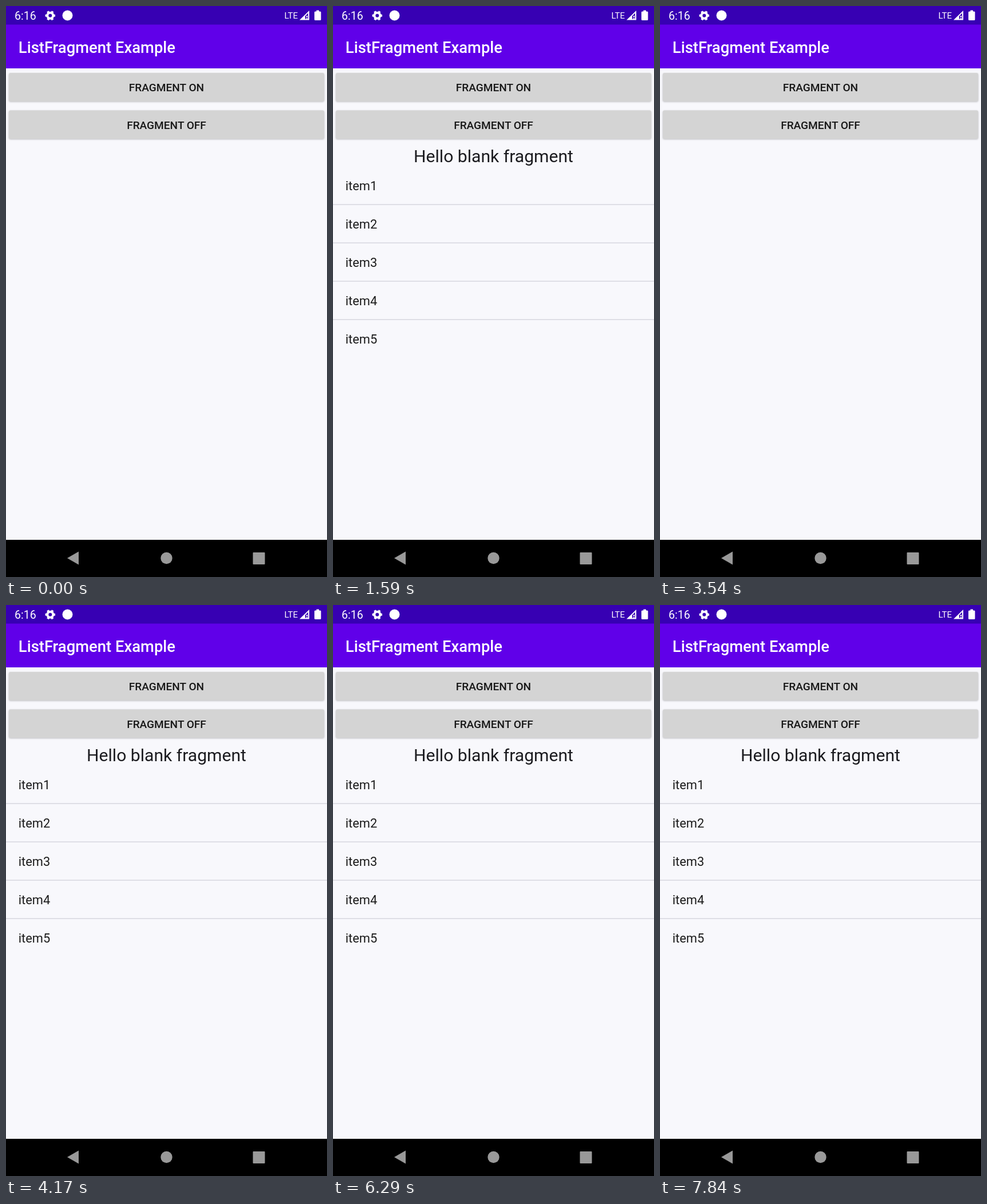
Recreate the animation shown at these times as an HTML page. Size 561x998 px, loop 8 s.

```html
<!DOCTYPE html>
<html lang="en">
<head>
<meta charset="utf-8">
<title>ListFragment Example</title>
<style>
  html, body { margin: 0; width: 100%; height: 100%; overflow: hidden; background: #f8f8fc; }
  svg { display: block; width: 100vw; height: 100vh; font-family: Roboto, sans-serif; }
  .title { font-size: 27.4px; font-weight: 500; fill: #fff; }
  .label { font-size: 19.1px; font-weight: 500; fill: #171717; text-anchor: middle; }
  .button { fill: #d4d4d4; filter: drop-shadow(0 1.5px 1.5px rgba(0, 0, 0, .25)); }
  .hello { font-size: 30.1px; fill: #1b1b1f; text-anchor: middle; }
  .item { font-size: 21.8px; fill: #1b1b1b; }
  .divider { fill: #d6d6df; }
  .status { fill: #fff; }
  .nav { fill: #999; }
</style>
</head>
<body>
<svg viewBox="0 0 561 998" preserveAspectRatio="none">
  <rect width="561" height="998" fill="#f8f8fc"/>
  <rect y="32" width="561" height="77" fill="#6000e9"/>
  <rect width="561" height="32.5" fill="#3700b3"/>

  <g class="status">
    <text x="15" y="24" font-size="19.5">6:16</text>
    <g id="gear" transform="translate(77.3 16.8)">
      <circle r="5" fill="none" stroke="#fff" stroke-width="4"/>
    </g>
    <circle cx="107.5" cy="16.5" r="9"/>
    <text x="486.5" y="22" font-size="15">LTE</text>
    <path d="M513 24.5 530 8V24.5Z"/>
    <path d="M523 17.5 528 12.5V22.5H523Z" fill="#3700b3"/>
    <path d="M525 17h2v3h-2zM525 21h2v2h-2z"/>
    <path d="M542.5 7.5h4.5v2h2q1.5 0 1.5 1.5v12.5q0 1.5-1.5 1.5h-8.500q-1.500 0-1.500-1.500V11q0-1.500 1.500-1.500h2z"/>
  </g>

  <text class="title" x="21.8" y="81.500">ListFragment Example</text>
  <g id="buttons"></g>
  <g id="fragment" opacity="0">
    <text class="hello" x="280.5" y="272.500">Hello blank fragment</text>
  </g>

  <rect y="933" width="561" height="65"/>
  <g class="nav">
    <path d="M107 965 127 953.500V976.500Z"/>
    <circle cx="280.5" cy="965" r="10.200"/>
    <rect x="431.500" y="955" width="21" height="21" rx="1"/>
  </g>
</svg>
<script>
  const LOOP = 8000;
  const ITEM_STEP = 67;
  const fragment = document.getElementById('fragment');

  function add(parent, tag, attrs, text = '') {
    const node = document.createElementNS(parent.namespaceURI, tag);
    for (const [name, value] of Object.entries(attrs)) node.setAttribute(name, value);
    node.textContent = text;
    parent.append(node);
  }

  const gear = document.getElementById('gear');
  for (let angle = 30; angle < 390; angle += 60) {
    add(gear, 'rect', { x: -2, y: -8.7, width: 4, height: 3.5, rx: 0.5, transform: `rotate(${angle})` });
  }

  const buttons = document.getElementById('buttons');
  ['FRAGMENT ON', 'FRAGMENT OFF'].forEach((label, i) => {
    const y = 117 + i * 65.5;
    add(buttons, 'rect', { class: 'button', x: 5, y, width: 551, height: 49.5, rx: 2.5 });
    add(buttons, 'text', { class: 'label', x: 280.5, y: y + 32.3 }, label);
  });

  for (let i = 0; i < 5; i++) {
    const y = 322 + i * ITEM_STEP;
    add(fragment, 'text', { class: 'item', x: 21.8, y }, `item${i + 1}`);
    if (i < 4) add(fragment, 'rect', { class: 'divider', x: 0, y: y + 24.3, width: 561, height: 1.5 });
  }

  // [time in ms, list visible]
  const visibility = [[0, 0], [1170, 1], [2190, 0], [3700, 1], [LOOP, 1]];
  fragment.animate(
    visibility.map(([time, opacity]) => ({ offset: time / LOOP, opacity, easing: 'step-end' })),
    { duration: LOOP, iterations: Infinity }
  );
</script>
</body>
</html>
```
